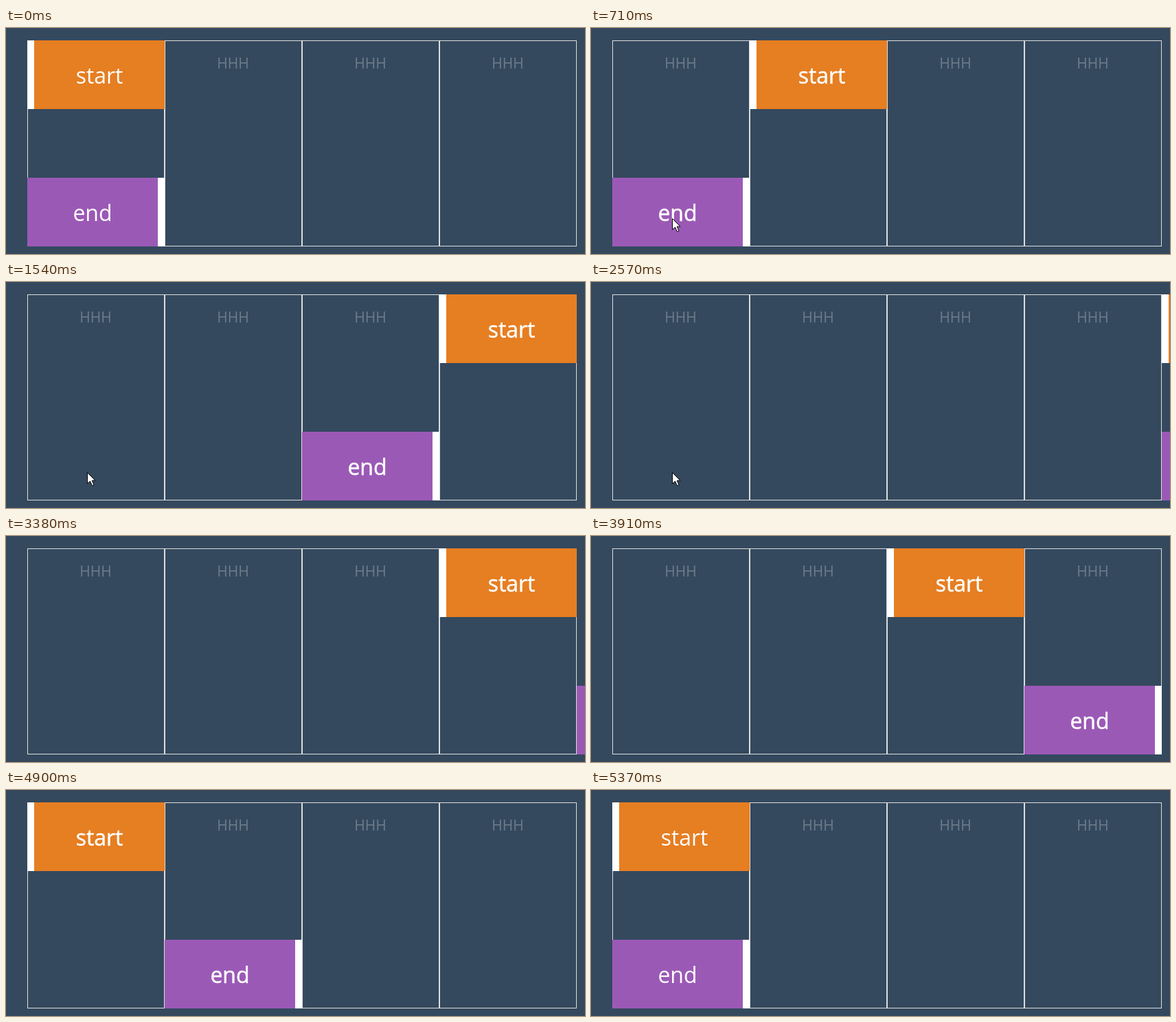
An HTML page with a canvas for the animation above (6.36 s loop, 843 by 329 pixels).

```html
<!DOCTYPE html>
<html lang="en">
<head>
<meta charset="utf-8">
<title>Step start and step end</title>
<style>
html, body { margin: 0; width: 100%; height: 100%; overflow: hidden; background: #34495e; }
canvas { display: block; }
</style>
</head>
<body>
<canvas id="stage" width="843" height="329"></canvas>
<script>
const ctx = document.getElementById('stage').getContext('2d');
const LOOP = 6360;
const LEFT = 31, TOP = 18, COL = 200, ROW = 100;
const FONT = '"Open Sans", "Noto Sans", sans-serif';

// Times at which each box moves one column forward, then back
const startMoves = { on: [550, 1050, 1540, 2070], off: [3380, 3910, 4400, 4900] };
const endMoves = { on: [1050, 1540, 2070, 2570], off: [3910, 4400, 4900, 5370] };

// Pointer poses: time, x, y
const pointer = [
  [500, 118, 320], [550, 118, 309], [600, 118, 297],
  [660, 118, 285], [710, 118, 277], [3320, 118, 285]
];
const POINTER_GONE = 3380;

function column(moves, t) {
  const passed = list => list.filter(m => t >= m).length;
  return passed(moves.on) - passed(moves.off);
}

function rect(color, x, y, w, h) {
  ctx.fillStyle = color;
  ctx.fillRect(x, y, w, h);
}

function label(text, x, y, size, color, heavy) {
  ctx.font = size + 'px ' + FONT;
  ctx.textAlign = 'center';
  ctx.fillStyle = color;
  ctx.fillText(text, x, y);
  if (heavy) {
    ctx.strokeStyle = color;
    ctx.lineWidth = 0.5;
    ctx.strokeText(text, x, y);
  }
}

function drawGrid() {
  ctx.strokeStyle = '#ddd';
  ctx.lineWidth = 1;
  for (let i = 0; i < 4; i++) {
    const x = LEFT + i * COL;
    ctx.strokeRect(x + 0.5, TOP + 0.5, COL - 1, ROW * 3 - 1);
    label('HHH', x + 99.5, 59, 21, '#6d7c8a', false);
  }
}

function drawBox(text, col, y, color, edge, heavy) {
  const x = LEFT + col * COL;
  const inner = edge === 'left' ? x + 10 : x;
  rect('#fff', x, y, COL, ROW);
  rect(color, inner, y, COL - 10, ROW);
  label(text, inner + 95, y + 63, 32, '#fff', heavy);
}

function drawPointer(t) {
  if (t >= POINTER_GONE) return;
  const pose = pointer.filter(p => t >= p[0]).pop();
  if (!pose) return;
  const shape = [0, 0, 0, 16, 4, 12.5, 7, 19, 9.5, 18, 6.7, 11.5, 11.5, 11.5];
  ctx.save();
  ctx.translate(pose[1] + 0.5, pose[2] + 0.5);
  ctx.beginPath();
  for (let i = 0; i < shape.length; i += 2) ctx.lineTo(shape[i], shape[i + 1]);
  ctx.closePath();
  ctx.fillStyle = '#fff';
  ctx.fill();
  ctx.strokeStyle = '#000';
  ctx.lineWidth = 1;
  ctx.stroke();
  ctx.restore();
}

function draw() {
  const t = performance.now() % LOOP;
  const moving = t >= 550 && t < 5370;
  rect('#34495e', 0, 0, 843, 329);
  drawGrid();
  drawBox('start', column(startMoves, t), TOP, '#e67e22', 'left', moving);
  drawBox('end', column(endMoves, t), TOP + 2 * ROW, '#9b59b6', 'right', moving);
  drawPointer(t);
  requestAnimationFrame(draw);
}
draw();
</script>
</body>
</html>
```
